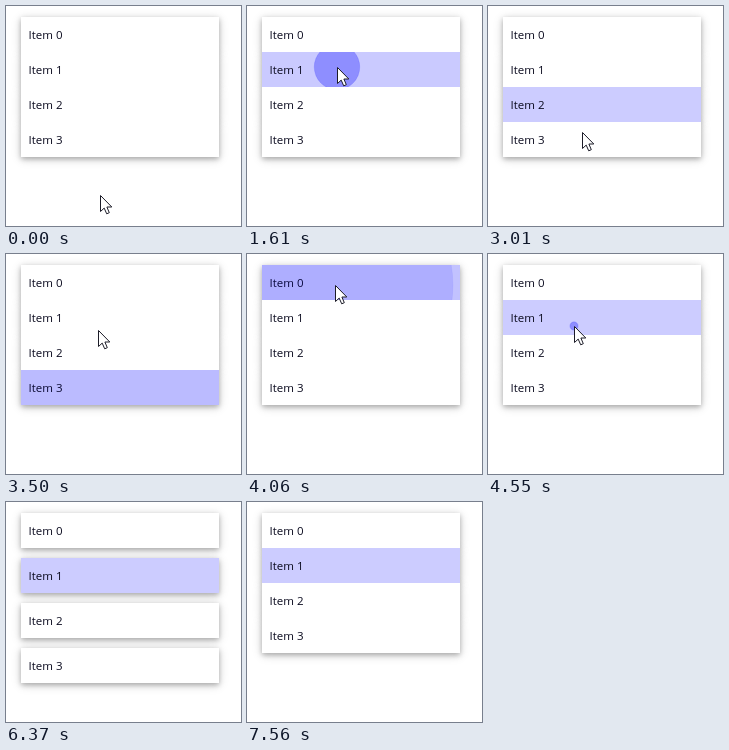
Animation of 235 by 220 pixels, one loop 8000 ms. Source, as an HTML page with a canvas:

```html
<!DOCTYPE html>
<html lang="en">
<head>
<meta charset="utf-8">
<title>Item list</title>
<style>
  html, body { margin: 0; width: 100%; height: 100%; overflow: hidden; background: #fff; }
  canvas { display: block; }
</style>
</head>
<body>
<canvas id="stage" width="235" height="220"></canvas>
<script>
const ctx = document.getElementById('stage').getContext('2d');
const LOOP = 8000, STEP = 70;
const LEFT = 15, TOP = 11, WIDTH = 198, ROW = 35, GAP = 10;

// Pointer path: start, end, target x, target y, sideways bow, eased
const START = [94, 189];
const MOVES = [
  [0, 210, 94, 184, 0, false],
  [420, 1470, 90, 61, 7, true],
  [1890, 2310, 91, 95, 0, true],
  [2520, 3220, 95, 134, 0, true],
  [3290, 3500, 92, 76, 0, false],
  [3500, 3850, 88, 31, 0, false],
  [4200, 4480, 86, 72, 0, true],
  [4760, 5180, 82, -24, 0, true]
];

const CLICKS = [
  { at: 1587, row: 1, x: 90, y: 61 },
  { at: 2368, row: 2, x: 91, y: 95 },
  { at: 3300, row: 3, x: 95, y: 134 },
  { at: 3900, row: 0, x: 88, y: 31 },
  { at: 4546, row: 1, x: 86, y: 72 }
];

const RIPPLE_LIFE = 230, RIPPLE_SIZE = 226, RIPPLE_TIME = 950;

const clamp = v => Math.max(0, Math.min(1, v));
const smooth = p => p * p * (3 - 2 * p);
const progress = (t, from, to) => clamp((t - from) / (to - from));
const blue = a => `rgba(0,0,255,${a})`;

function pointerAt(t) {
  let [x, y] = START;
  for (const [from, to, tx, ty, bow, eased] of MOVES) {
    if (t <= from) break;
    const raw = progress(t, from, to);
    const p = eased ? smooth(raw) : raw;
    x += (tx - x) * p + bow * Math.sin(Math.PI * p);
    y += (ty - y) * p;
  }
  return [Math.round(x), Math.round(y)];
}

function spreadAt(t) {
  return smooth(progress(t, 5900, 6370)) - smooth(progress(t, 7150, 7560));
}

function drawShadow(y, blur, alpha) {
  ctx.save();
  ctx.shadowColor = `rgba(0,0,0,${alpha})`;
  ctx.shadowBlur = blur;
  ctx.shadowOffsetY = 2;
  ctx.fillStyle = '#fff';
  ctx.fillRect(LEFT, y, WIDTH, ROW);
  ctx.restore();
}

function drawRipple(click, t, y) {
  const age = t - click.at;
  if (age >= RIPPLE_LIFE) return;
  const alpha = 0.3 * Math.min(1, 1.1 * (1 - age / RIPPLE_LIFE));
  const radius = RIPPLE_SIZE * (1 - Math.pow(80, -age / RIPPLE_TIME));
  ctx.save();
  ctx.beginPath();
  ctx.rect(LEFT, y, WIDTH, ROW);
  ctx.clip();
  ctx.fillStyle = blue(Math.min(alpha, age * 0.0003));
  ctx.fillRect(LEFT, y, WIDTH, ROW);
  ctx.beginPath();
  ctx.arc(click.x, click.y, radius, 0, 2 * Math.PI);
  ctx.fillStyle = blue(alpha);
  ctx.fill();
  ctx.strokeStyle = blue(alpha * 0.4);
  ctx.stroke();
  ctx.restore();
}

function drawPointer(x, y) {
  ctx.save();
  ctx.translate(x + 0.5, y + 0.5);
  ctx.beginPath();
  ctx.moveTo(0, 0);
  ctx.lineTo(0, 16);
  ctx.lineTo(3.7, 12.6);
  ctx.lineTo(6.2, 18.3);
  ctx.lineTo(8.8, 17.2);
  ctx.lineTo(6.4, 11.5);
  ctx.lineTo(11.3, 11.5);
  ctx.closePath();
  ctx.fillStyle = '#fff';
  ctx.fill();
  ctx.strokeStyle = '#1c1c28';
  ctx.stroke();
  ctx.restore();
}

function draw(t) {
  ctx.fillStyle = '#fff';
  ctx.fillRect(0, 0, 235, 220);

  const pitch = ROW + GAP * spreadAt(t);
  const tops = [0, 1, 2, 3].map(i => Math.round(TOP + i * pitch));
  const click = CLICKS.filter(c => c.at <= t).pop();

  tops.forEach(y => {
    drawShadow(y, 10, 0.16);
    drawShadow(y, 5, 0.26);
  });

  ctx.font = '11.5px "Open Sans", "Noto Sans", sans-serif';
  tops.forEach((y, i) => {
    ctx.fillStyle = '#fff';
    ctx.fillRect(LEFT, y, WIDTH, ROW);
    if (click && click.row === i) {
      ctx.fillStyle = '#ccccff';
      ctx.fillRect(LEFT, y, WIDTH, ROW);
    }
    ctx.fillStyle = '#0a0a1e';
    ctx.fillText('Item ' + i, LEFT + 7.5, y + 22);
    if (click && click.row === i) drawRipple(click, t, y);
  });

  if (t < 5180) drawPointer(...pointerAt(t));
}

const begin = performance.now();
function tick() {
  const t = (performance.now() - begin) % LOOP;
  draw(Math.floor(t / STEP) * STEP);
  requestAnimationFrame(tick);
}
tick();
</script>
</body>
</html>
```
